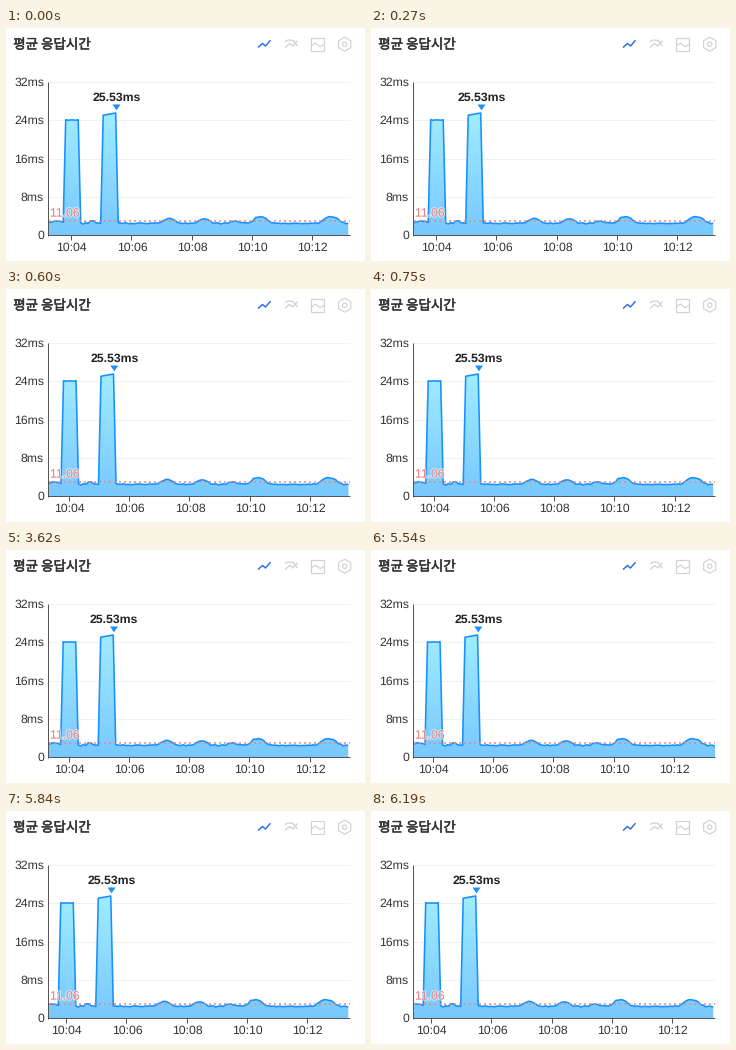
Recreate the animation shown at these times as a matplotlib script. Size 359x233 px, loop 6430 ms.

```python
import numpy as np
import matplotlib.pyplot as plt
from matplotlib.animation import FuncAnimation
from matplotlib.patches import Circle, Polygon, Rectangle, RegularPolygon
from matplotlib.patheffects import withStroke

W, H, DPI = 359, 233, 64
PX = 72 / DPI                      # points per pixel
LOOP, STEPS = 6430, 43
LEFT, RIGHT, BASE = 42.2, 343.5, 207
GRID = 38.25                       # pixels per 8 ms
SHIFT = 2.5                        # pixels between samples, one per refresh
END = 342.2                        # last sample before any refresh
PEAK_X = 110.5
REFRESH = ((3, 0.4), (37, 0.3))    # first step, progress per step
INK, AXIS, BLUE, GRAY, RED = "#333333", "#555555", "#1890ff", "#d2d2d2", "#e88484"

# center, half width and height of the low bumps
BUMPS = ((50, 8, 2), (86, 3, 2.4), (163, 7, 4.8), (198, 7, 4.4),
         (228, 5, 2.3), (254, 8, 6.5), (325, 9, 6.6))


def response_curve():
    """Quiet noisy load with low bumps and two tall plateaus."""
    rng = np.random.default_rng(4)
    x = END + SHIFT * np.arange(-121, len(REFRESH) + 1)
    y = 195.3 + rng.normal(0, 0.35, x.size)
    for center, width, height in BUMPS:
        y -= height * np.exp(-np.abs((x - center) / width) ** 3)
    first = (x > 59) & (x < 73.5)
    second = (x > 96) & (x < 111)
    y[first] = 92 + 0.3 * np.cos(x[first])
    y[second] = np.linspace(87.2, 85, second.sum())
    return np.column_stack([x, y])


CURVE = response_curve()

plt.rcParams["text.hinting"] = "none"
plt.rcParams["font.family"] = "Liberation Sans"
plt.rcParams["lines.solid_capstyle"] = "butt"
fig = plt.figure(figsize=(W / DPI, H / DPI), dpi=DPI, facecolor="white")
ax = fig.add_axes([0, 0, 1, 1])
ax.axis("off")


def stroke(points, color, width, z=1, **kw):
    x, y = zip(*points)
    return ax.plot(x, y, color=color, lw=width * PX, zorder=z, **kw)[0]


def label(x, y, text, size=12.2, color=INK, **kw):
    return ax.text(x, y, text, fontsize=size * PX, color=color,
                   va="baseline", zorder=8, **kw)


def draw_icons():
    outline = dict(fill=False, ec=GRAY, lw=1.2 * PX)
    stroke([(252, 19.5), (256.5, 15.5), (259.5, 18), (264.5, 12.2)], "#2f6fe8", 1.5)
    stroke([(279, 19.5), (283.5, 15.5), (287, 18), (291.5, 12.5)], GRAY, 1.3)
    stroke([(279, 13.6), (282, 12), (287, 12.4), (291.5, 18)], GRAY, 1.3)
    ax.add_patch(Rectangle((305.2, 9.7), 13, 13, **outline))
    stroke([(306, 17.5), (309.5, 15), (314, 18.7), (318, 16.5)], GRAY, 1.2)
    ax.add_patch(RegularPolygon((338.7, 16.2), 6, radius=7, **outline))
    ax.add_patch(Circle((338.7, 16.2), 2.2, **outline))


def draw_axes():
    for k in range(5):
        y = BASE - GRID * k
        if k:
            stroke([(LEFT, y), (RIGHT, y)], "#f2f2f2", 1, 0)
        label(38, y + 4, f"{8 * k}ms" if k else "0", ha="right")
    stroke([(LEFT, 53.5), (LEFT, BASE + 1)], AXIS, 1, 6)
    stroke([(LEFT, BASE + 0.2), (RIGHT, BASE + 0.2)], AXIS, 1, 6)


label(7.2, 20.6, "평균 응답시간", 13.5, family="Noto Sans CJK JP",
      path_effects=[withStroke(linewidth=0.5 * PX, foreground=INK)])
draw_icons()
draw_axes()

# gradient fill cut out by the moving curve
ramp = np.linspace((160, 236, 255), (120, 200, 255), 128)[:, None] / 255
fill = ax.imshow(ramp, extent=(LEFT, RIGHT, BASE, 85), aspect="auto",
                 interpolation="bilinear", zorder=2)
shape = Polygon(CURVE, closed=True, transform=ax.transData)
fill.set_clip_path(shape)

line = stroke(CURVE, BLUE, 1.6, 3, solid_joinstyle="round")
line.set_clip_path(Rectangle((LEFT, BASE + 1), RIGHT - LEFT, -167,
                             transform=ax.transData))

stroke([(43, 193), (RIGHT, 193)], RED, 2, 4, alpha=0.75,
       dashes=(1, 1.5), dash_capstyle="butt")
label(44, 188.6, "11.06", color=RED,
      path_effects=[withStroke(linewidth=2 * PX, foreground=(1, 1, 1, 0.6))])

peak = label(PEAK_X, 73.2, "25.53ms", color="#222222", weight="bold", ha="center")
arrow = Polygon([(0, 0), (1, 0), (0, 1)], fc=BLUE, ec="none", zorder=7)
ax.add_patch(arrow)

ticks = [stroke([(0, BASE), (0, BASE + 5)], AXIS, 1, 6) for _ in range(5)]
times = [label(0, 222.5, f"10:{4 + 2 * k:02d}", ha="center") for k in range(5)]

ax.set_xlim(0, W)
ax.set_ylim(H, 0)


def update(i):
    offset, hidden = 0, len(REFRESH)
    for start, rate in REFRESH:
        if i >= start:
            p = min(1, 0.1 + rate * (i - start))
            offset += SHIFT * (1 - (1 - p) ** 3)
            hidden -= 1
    pts = CURVE[:len(CURVE) - hidden] - (offset, 0)
    line.set_data(pts[:, 0], pts[:, 1])
    shape.set_xy(np.vstack([pts, (pts[-1, 0], BASE), (pts[0, 0], BASE)]))
    x = PEAK_X - offset
    peak.set_x(x)
    arrow.set_xy([(x - 4, 76.5), (x + 4, 76.5), (x, 82.3)])
    for k in range(5):
        x = 65.7 + 60.2 * k - offset
        ticks[k].set_xdata([x - 0.5, x - 0.5])
        times[k].set_x(x)
    return [line, fill, peak, arrow, *ticks, *times]


anim = FuncAnimation(fig, update, frames=STEPS, interval=LOOP / STEPS,
                     init_func=lambda: update(0), repeat=True, repeat_delay=0)
plt.show()
```
